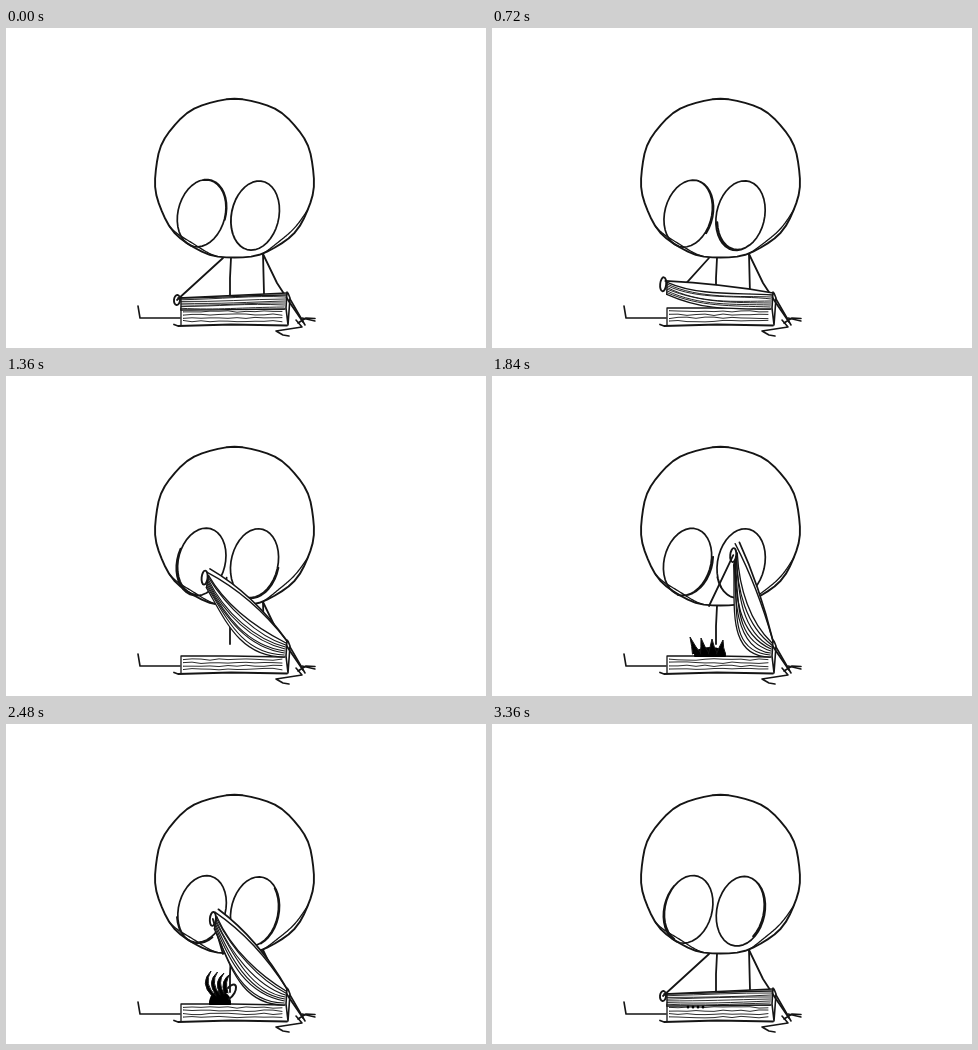
An HTML page with a canvas for the animation above (3.44 s loop, 480 px wide and 320 px high).

```html
<!DOCTYPE html>
<html lang="en">
<head>
<meta charset="utf-8">
<title>Book and hand</title>
<style>
html, body { margin: 0; width: 100%; height: 100%; overflow: hidden; background: #fff; }
canvas { display: block; }
</style>
</head>
<body>
<canvas id="stage" width="480" height="320"></canvas>
<script>
const ctx = document.getElementById('stage').getContext('2d');
const STEP = 80, STEPS = 43, INK = '#151515', TAU = Math.PI * 2;
const { sin, cos } = Math;
ctx.lineCap = ctx.lineJoin = 'round';

let seed = 1;
function wobble(size) {
  const n = sin(++seed * 127.1) * 43758.5453;
  return (n - Math.floor(n) - 0.5) * 2 * size;
}
const lerp = (a, b, u) => a + (b - a) * u;
const ramp = (t, a, b) => Math.min(1, Math.max(0, (t - a) / (b - a)));
const pulse = (t, a, b, c, d) => ramp(t, a, b) - ramp(t, c, d);

// Points are [x, y]; a bend is a cubic curve of four points
const add = (p, x, y) => [p[0] + x, p[1] + y];
const between = (p, q, u) => [lerp(p[0], q[0], u), lerp(p[1], q[1], u)];
const blend = (a, b, u) => a.map((p, i) => between(p, b[i], u));

function ink(width = 1.8) {
  ctx.lineWidth = width;
  ctx.strokeStyle = INK;
  ctx.stroke();
}
function line(points, width) {
  ctx.beginPath();
  for (const p of points) ctx.lineTo(...p);
  ink(width);
}
function bend([a, b, c, d], width) {
  ctx.beginPath();
  ctx.moveTo(...a);
  ctx.bezierCurveTo(...b, ...c, ...d);
  ink(width);
}
function oval(x, y, rx, ry, tilt = 0) {
  ctx.beginPath();
  ctx.ellipse(x, y, rx, ry, tilt, 0, TAU);
}
// White area between two bends
function sheet([a, b, c, d], [e, f, g, h]) {
  ctx.beginPath();
  ctx.moveTo(...a);
  ctx.bezierCurveTo(...b, ...c, ...d);
  ctx.lineTo(...h);
  ctx.bezierCurveTo(...g, ...f, ...e);
  ctx.fillStyle = '#fff';
  ctx.fill();
}

// Part of the slightly squarish head outline
function headArc(from, to, inset, width) {
  const points = [];
  for (let i = 0; i <= 60; i++) {
    const q = lerp(from, to, i / 60);
    const r = 80 - 0.6 * cos(4 * q) + 0.4 * sin(11 * q) - inset * sin(Math.PI * i / 60);
    points.push([228.5 + r * cos(q), 150.5 + r * sin(q)]);
  }
  line(points, width);
}

// Drifting pen loop that overshoots its start
function drawEye(x, y, rx, ry, tilt) {
  const from = wobble(2), dx = wobble(2), dy = wobble(1.2), points = [];
  for (let i = 0; i <= 48; i++) {
    const u = i / 48, q = from + u * 8.2;
    const ex = rx * cos(q), ey = ry * sin(q);
    points.push([x + ex * cos(tilt) - ey * sin(tilt) + dx * (u - 0.5),
      y + ex * sin(tilt) + ey * cos(tilt) + dy * (u - 0.5)]);
  }
  line(points, 1.7);
}

function drawFigure() {
  line([[132, 278], [134, 290], [174, 290]], 1.6);
  line([[225, 230], [224, 250], [224, 268]]);
  line([[257, 226], [258, 266]]);
  line([[257, 226], [271, 255], [284, 275], [297, 294]]);
  headArc(0, TAU, 0, 1.9);
  headArc(0.4, 1.2, 3.5 + wobble(0.6), 1.3);
  headArc(1.8, 2.5, 3 + wobble(0.6), 1.3);
  drawEye(196 + wobble(0.5), 185.5 + wobble(0.5), 23.7, 34.2, 0.26);
  drawEye(249.3 + wobble(0.8), 187.3 + wobble(0.5), 23.7, 35, 0.21);
}

function drawBlock() {
  ctx.fillStyle = '#fff';
  ctx.fillRect(175, 280, 106, 17);
  line([[175, 297], [175, 280], [225, 280], [279, 281]], 1.3);
  for (let y = 283.5; y < 295; y += 3.2) {
    const points = [];
    for (let x = 177; x < 281; x += 9) points.push([x, y + wobble(0.8)]);
    line(points, 0.9);
  }
  line([[168, 296.5], [172, 298], [225, 296.5], [281, 297.5]]);
}

function drawRightSide() {
  line([[281, 264], [280, 280], [282, 297], [284, 270], [282, 265]], 1.6);
  line([[284, 271], [299, 297]], 1.6);
  line([[292, 295], [300, 290], [309, 290.5]], 1.6);
  line([[296, 290], [309, 293]], 1.3);
  line([[290, 292], [296, 299], [270, 303], [277, 307], [283, 308]], 1.6);
}

// The page swings at a steady rate around its spine, then drops
function pageAt(t) {
  const lift = 85 * pulse(t, 560, 2070, 2320, 2720);
  const a = lift * TAU / 360;
  const tip = [281 - 109 * cos(a), 270 - 109 * sin(a)];
  const hinge = [281, 265], spine = [278, 281];
  const bow = 7 * sin(2 * a);
  const cover = [tip, add(between(tip, hinge, 0.33), bow / 2, -bow),
    add(between(tip, hinge, 0.67), bow / 2, -bow), hinge];
  const lining = cover.map((p, i) => add(p, -(3 - i) * 1.5 * sin(a), (3 - i) * 1.5 * cos(a)));

  // Pages leave the spine flat and sag more steeply than the cover
  const sag = a + 0.26 * ramp(lift, 0, 9);
  const top = add(tip, 3 * (1 - ramp(lift, 0, 30)) - lift * 0.03, lift * 0.15);
  const low = add(top, -lift * 0.05, 12);
  const along = (p, d) => add(p, d * cos(sag), d * sin(sag));
  const upper = [top, along(top, 36), [280 - 30 * cos(a * 0.6), 267 - 30 * sin(a * 0.6)], [280, 267]];
  const lower = [low, along(low, 38), add(spine, -44, 0), spine];
  return { lift, cover, lining, upper, lower, grip: add(top, -4, 2) };
}

function drawArm(t, page) {
  const slide = 22 * (pulse(t, 400, 720, 1360, 1600) + pulse(t, 2480, 2640, 2880, 3120));
  line([[217, 230], add(page.grip, slide, 0)]);
}

function drawPage(t, { lift, cover, lining, upper, lower, grip }) {
  sheet(cover, upper);
  sheet(upper, lower);
  const shake = 2 + lift / 40;
  for (let i = 1; i < 7; i++) {
    const [a, b, c, d] = blend(upper, lower, i / 7);
    bend([a, add(b, wobble(shake), wobble(shake)), add(c, wobble(shake), wobble(shake)), d], 0.9 + lift / 250);
  }
  bend(upper, 1.3);
  bend(lower, 1.3);
  if (lift > 20) bend(lining, 1.4);
  bend(cover, 1.7);
  line([upper[0], lower[0]], 1.3);
  if (pulse(t, 2480, 2640, 2880, 3120)) return;
  oval(...grip, 3, lift > 0 ? 7 : 5, 0.1);
  ink(1.9);
}

// Black hand: spikes rise from the block, then curl into claws
function drawHand(t) {
  const rise = ramp(t, 1480, 1840), curl = ramp(t, 1840, 2160);
  if (!rise || t >= 2720) return;
  ctx.save();
  ctx.beginPath();
  ctx.rect(180, 220, 80, 61);
  ctx.clip();
  ctx.translate(0, 22 * (1 - rise));
  ctx.fillStyle = '#000';
  oval(lerp(218, 214, curl), 279, lerp(16, 11, curl), lerp(8, 12, curl));
  ctx.fill();
  for (let i = 0; i < 4; i++) {
    const base = lerp(205 + 8 * i, 208 + 4 * i, curl), foot = lerp(278, 272 - i, curl);
    const bx = lerp(201 + 9 * i, 194 + 7 * i, curl), by = lerp(271, 259 - i, curl);
    const tip = [lerp(198 + 11 * i, 205 + 6.5 * i, curl), lerp(261 + i, 247 + i, curl)];
    const w = lerp(4.5, 2, curl);
    ctx.beginPath();
    ctx.moveTo(base - w, foot);
    ctx.quadraticCurveTo(bx - 1, by, ...tip);
    ctx.quadraticCurveTo(bx + 3, by + 1, base + w, foot);
    ctx.fill();
    ink(1);
  }
  if (curl > 0.5) bend([[223, 275], [233, 268], [232, 254], [222, 264]], 2);
  ctx.restore();
}

// Trapped fingers slip back between the pages
function drawFingers(t) {
  if (t < 2720) return;
  const u = ramp(t, 2800, 3360);
  ctx.fillStyle = '#000';
  for (let i = 0; i < 4; i++) {
    const y = lerp(268 + i % 2, 283, u);
    oval(lerp(195 + 4.7 * i, 196 + 5 * i, u), y, lerp(2, 1.4, u), lerp(9.5, 1.5, u));
    ctx.fill();
  }
  if (u < 0.8) line([[222, 270 + 9 * u], [221, 276 + 4 * u], [218, 278 + 3 * u]], 2.8 - u);
}

function draw(k) {
  const t = k * STEP, page = pageAt(t);
  seed = k * 97 + 5;
  ctx.fillStyle = '#fff';
  ctx.fillRect(0, 0, 480, 320);
  drawFigure();
  drawArm(t, page);
  drawBlock();
  drawHand(t);
  drawPage(t, page);
  drawRightSide();
  drawFingers(t);
}

const begin = performance.now();
function tick() {
  draw(Math.floor(Math.max(0, performance.now() - begin) / STEP) % STEPS);
  requestAnimationFrame(tick);
}
tick();
</script>
</body>
</html>
```
